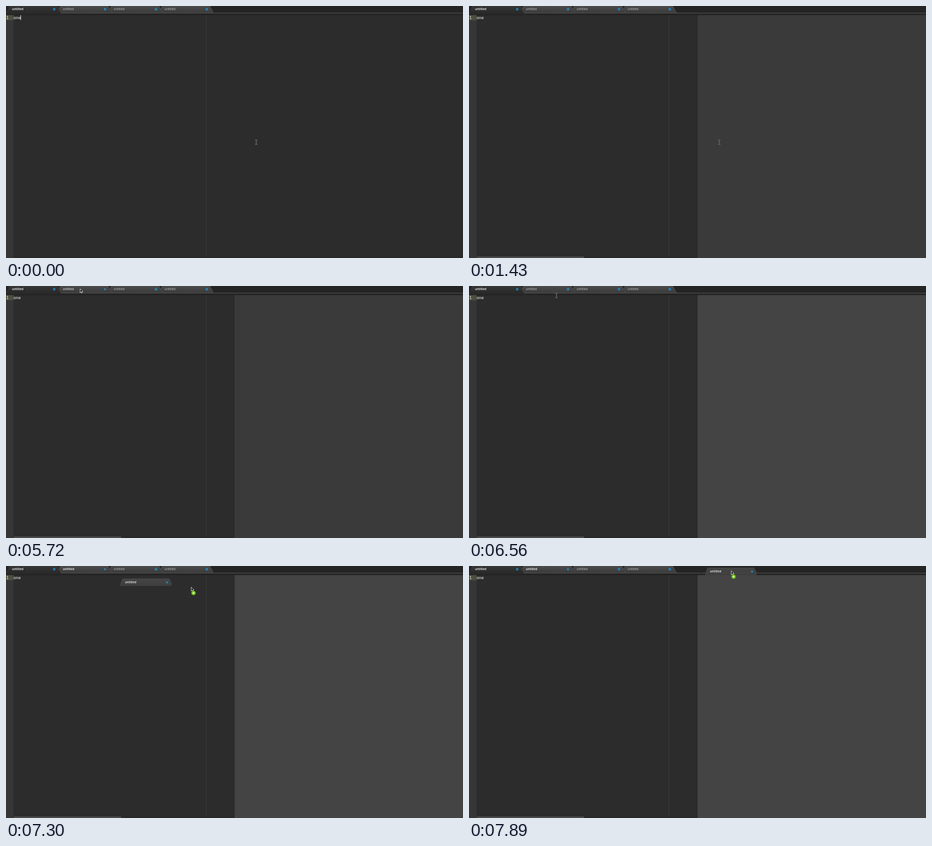
Recreate the animation shown at these times as an HTML page with a canvas. Size 1008 by 556 pixels, loop 8 s.

```html
<!DOCTYPE html>
<html lang="en">
<head>
<meta charset="utf-8">
<title>Editor tabs</title>
<style>
html, body { margin: 0; width: 100%; height: 100%; overflow: hidden; background: #2c2c2c; }
canvas { display: block; }
</style>
</head>
<body>
<canvas id="stage" width="1008" height="556"></canvas>
<script>
const ctx = document.getElementById('stage').getContext('2d');
const LOOP = 8000, SPLIT = 1430, BLUR = 6170, TAB = 112.2;
const BLUE = '#1c9be6';

// Pointer poses: start time, kind, x, y, dragged tab x, y
const poses = [
  [0, 'beam', 552, 300.5],
  [5030, 'arrow', 547, 262],
  [5270, 'beam', 271, 128.5],
  [5420, 'beam', 172.5, 54.5],
  [5570, 'beam', 167, 23.5],
  [5720, 'arrow', 163, 5.5],
  [5870, 'arrow', 163, 6],
  [6320, 'arrow', 174, 11],
  [6560, 'beam', 193, 21],
  [6710, 'arrow', 184, 8],
  [6850, 'arrow', 174, 8],
  [7000, 'copy', 186, 12, 128, 4],
  [7150, 'copy', 211, 25, 142, 13],
  [7300, 'copy', 408, 46, 252, 27],
  [7450, 'copy', 575, 28, 505, 24],
  [7600, 'copy', 577, 17, 516, 13],
  [7750, 'copy', 578, 12, 521, 5],
  [7890, 'copy', 578, 10, 521, 3]
];
const caretFlips = [0, 140, 530, 980, 1280, 1430, 6170, 6560];

function rect(color, x, y, w, h) {
  ctx.fillStyle = color;
  ctx.fillRect(x, y, w, h);
}

function path(points, close = true) {
  ctx.beginPath();
  points.forEach(([x, y]) => ctx.lineTo(x, y));
  if (close) ctx.closePath();
}

function line(points, color, width) {
  path(points, false);
  ctx.strokeStyle = color;
  ctx.lineWidth = width;
  ctx.stroke();
}

function fade(top, bottom, y, h) {
  const g = ctx.createLinearGradient(0, y, 0, y + h);
  g.addColorStop(0, top);
  g.addColorStop(1, bottom);
  return g;
}

function label(x, y, bright, color) {
  ctx.font = (bright ? '600 6.6px' : '6.7px') + ' "Open Sans", sans-serif';
  ctx.fillStyle = color;
  ctx.fillText('untitled', x, y);
}

function ring(x, y) {
  ctx.beginPath();
  ctx.arc(x, y, 1.9, 0, 7);
  ctx.strokeStyle = BLUE;
  ctx.lineWidth = 1.4;
  ctx.stroke();
}

function cross(x, y) {
  line([[x - 1.7, y - 1.7], [x + 1.7, y + 1.7]], BLUE, 1.4);
  line([[x + 1.7, y - 1.7], [x - 1.7, y + 1.7]], BLUE, 1.4);
}

function tab(i, hover) {
  const x = i * TAB, active = i === 0;
  path([[x, 15.5], [x + 7, 0], [x + 113, 0], [x + 121.5, 15.5]]);
  ctx.fillStyle = active ? fade('#353535', '#2a2a2a', 0, 15) : fade('#4b4b4b', '#3b3b3b', 0, 15);
  ctx.fill();
  line([[x + 113, 0], [x + 121.5, 15.5]], active ? '#454545' : '#505050', 0.8);
  const bright = active || hover > 1;
  label(x + 13.2, 9.1, bright, active || hover ? '#fff' : '#c8c8c8');
  if (hover) cross(x + 106.2, 7.2);
  else ring(x + 106.3, 7.1);
}

function ghost(x, y) {
  path([[x, y + 17], [x, y + 12], [x + 5, y + 0.5], [x + 108, y + 0.5], [x + 113.5, y + 11], [x + 113.5, y + 17]]);
  ctx.fillStyle = fade('rgba(76,76,76,.8)', 'rgba(67,67,67,.8)', y, 17);
  ctx.fill();
  label(x + 10.4, y + 11.3, true, '#f4f4f4');
  cross(x + 103.2, y + 9.2);
}

function beam(x, y) {
  const draw = (color, w) => {
    line([[x, y - 4.3], [x, y + 4.3]], color, w);
    for (const s of [-1, 1]) {
      line([[x - 2.5, y + s * 4.8], [x - 0.7, y + s * 4.5], [x, y + s * 3.7],
        [x + 0.7, y + s * 4.5], [x + 2.5, y + s * 4.8]], color, w);
    }
  };
  draw('#7c7c7c', 1.9);
  draw('#303030', 0.7);
}

function arrow(x, y) {
  path([[0.5, 0.7], [0.5, 9.2], [2.5, 7.3], [3.9, 10.3], [5.2, 9.7], [3.9, 6.8], [6.7, 6.7]]
    .map(([a, b]) => [x + a, y + b]));
  ctx.fillStyle = '#111';
  ctx.fill();
  ctx.strokeStyle = '#f2f2f2';
  ctx.lineWidth = 0.9;
  ctx.stroke();
}

function badge(x, y) {
  ctx.beginPath();
  ctx.arc(x, y, 5, 0, 7);
  ctx.fillStyle = fade('#7cc51f', '#55a30a', y - 5, 10);
  ctx.fill();
  line([[x - 2.6, y], [x + 2.6, y]], '#fff', 1.5);
  line([[x, y - 2.6], [x, y + 2.6]], '#fff', 1.5);
}

function hoverAt(t) {
  if (t < 5720 || (t >= 6560 && t < 6710)) return 0;
  return t < 5870 || (t >= 6710 && t < 6850) ? 1 : 2;
}

function editor(t) {
  rect('#2c2c2c', 0, 20, 1008, 536);
  rect('#363636', 0, 20, 16.5, 536);
  rect('#4d4d40', 0, 20, 16.5, 11.5);
  rect('#3d3d3d', 441, 20, 1, 532);
  rect('#292929', 16.5, 552, 991.5, 4);
  if (t >= SPLIT) {
    rect('#4b4b4b', 17, 552.5, 237, 3.5);
    rect('#252525', 503, 20, 1, 536);
    rect(t < BLUR ? '#3a3a3a' : '#444444', 504, 20, 504, 536);
  }
  ctx.font = '9px "DejaVu Sans Mono", monospace';
  ctx.fillStyle = '#fff';
  ctx.fillText('one', 16.4, 29);
  ctx.fillStyle = '#eeeee4';
  ctx.fillText('1', 0.4, 29);
  if (caretFlips.filter(f => f <= t).length % 2) rect('#f0f0f0', 32, 20, 1, 11);
}

function draw(t) {
  editor(t);
  rect('#242424', 0, 0, 1008, 15);
  for (let i = 3; i >= 0; i--) tab(i, i === 1 ? hoverAt(t) : 0);
  rect('#292929', 0, 15, 1008, 4);
  rect('#565656', 121, 15, 887, 1);
  rect('#1b1b1b', 0, 19, 1008, 1);

  const [, kind, x, y, gx, gy] = poses.filter(p => p[0] <= t).pop();
  if (t >= 7150 && t < 7300) rect(BLUE, 340, 0, 1.6, 20.5);
  if (kind === 'copy') ghost(gx, gy);
  if (kind === 'beam') beam(x, y);
  else arrow(x, y);
  if (kind === 'copy') badge(x + 5.6, y + 13.7);
}

const start = performance.now();
function tick() {
  draw((performance.now() - start) % LOOP);
  requestAnimationFrame(tick);
}
tick();
</script>
</body>
</html>
```
